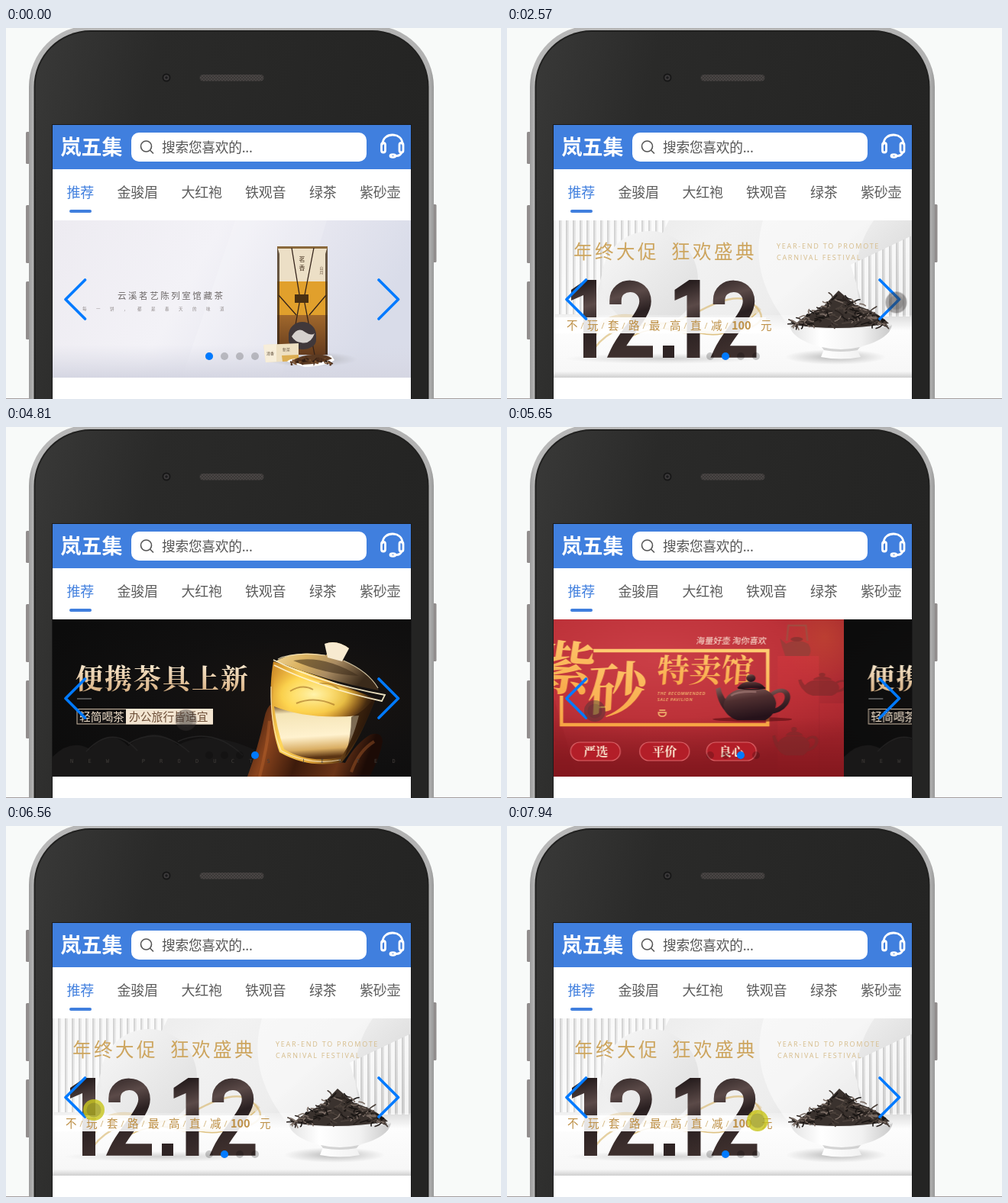
An HTML page for the animation above (8000 ms loop, 648 px wide and 486 px high).

```html
<!DOCTYPE html>
<html lang="zh-CN">
<head>
<meta charset="utf-8">
<title>Tea shop carousel</title>
<style>
html, body { margin: 0; width: 100%; height: 100%; overflow: hidden; background: #f8faf9; }
svg { display: block; }
text { font-family: "Noto Sans CJK SC", "Noto Sans CJK", "Noto Sans", sans-serif; }
.serif { font-family: "Noto Serif CJK SC", "Noto Sans CJK SC", "Noto Serif", serif; font-weight: 700; }
.latin { font-family: "Open Sans", "Noto Sans", sans-serif; }
.nav { font-size: 18px; letter-spacing: -.2px; fill: #5c5c5c; }
.arrow { fill: none; stroke: #007aff; stroke-width: 3.6; stroke-linecap: round; stroke-linejoin: round; }
.line { fill: none; }

#track { animation: slide 8s linear infinite; }
#active { animation: dot 8s step-end infinite; }
#cursor { animation: move 8s linear infinite; }
#tip { animation: press 8s step-end infinite; }

@keyframes slide {
  0% { transform: translateX(0); }
  27.75% { transform: translateX(0); animation-timing-function: ease; }
  31.5% { transform: translateX(-469px); }
  40.875% { transform: translateX(-469px); animation-timing-function: ease; }
  44.625% { transform: translateX(-938px); }
  50.25% { transform: translateX(-938px); animation-timing-function: ease; }
  54% { transform: translateX(-1407px); }
  68.73% { transform: translateX(-1407px); animation-timing-function: ease; }
  72.48% { transform: translateX(-938px); }
  76.125% { transform: translateX(-938px); animation-timing-function: ease; }
  79.875% { transform: translateX(-469px); }
  83.625% { transform: translateX(-469px); animation-timing-function: ease; }
  87.375% { transform: translateX(0); }
  93.125% { transform: translateX(0); }
  95% { transform: translateX(-100px); animation-timing-function: ease; }
  98.75%, 99% { transform: translateX(-469px); }
  99.2%, 100% { transform: translateX(-468px); }
}
@keyframes dot {
  0% { transform: translateX(0); }
  27.75% { transform: translateX(20px); }
  40.875% { transform: translateX(40px); }
  50.25% { transform: translateX(60px); }
  68.73% { transform: translateX(40px); }
  76.125% { transform: translateX(20px); }
  83.625% { transform: translateX(0); }
  95%, 100% { transform: translateX(20px); }
}
@keyframes move {
  0%, 4.5% { transform: translate(593px, 505px); animation-timing-function: ease-out; }
  8.3%, 10.7% { transform: translate(492px, 366px); }
  13.6%, 22.7% { transform: translate(512px, 361px); }
  22.75%, 57.6% { transform: translate(509.5px, 359.5px); }
  60.1% { transform: translate(237px, 384px); animation-timing-function: ease-out; }
  65.5%, 90.6% { transform: translate(115px, 372px); }
  93.125% { transform: translate(428px, 390px); }
  95%, 100% { transform: translate(328px, 386px); }
}
@keyframes press {
  0%, 27.75%, 40.875%, 50.25%, 68.73%, 76.125%, 83.625%, 95% { fill: rgba(60,56,56,.42); }
  25.25%, 39.75%, 49.125%, 67.95%, 75.125%, 81.95%, 93.125%, 99%, 100% { fill: rgba(200,198,30,.82); }
}
</style>
</head>
<body>
<svg width="648" height="486" viewBox="0 0 648 486">
<defs>
  <linearGradient id="body" x2="1" y2=".25"><stop stop-color="#393938"/><stop offset=".3" stop-color="#2a2a29"/><stop offset="1" stop-color="#242423"/></linearGradient>
  <linearGradient id="rim" x2="1"><stop stop-color="#9c9c9c"/><stop offset=".012" stop-color="#b8b8b8"/><stop offset=".988" stop-color="#b2b2b2"/><stop offset="1" stop-color="#999"/></linearGradient>
  <pattern id="mesh" width="4" height="4" patternUnits="userSpaceOnUse"><rect width="4" height="4" fill="#4a4645"/><circle cx="1" cy="1" r=".8" fill="#272525"/><circle cx="3" cy="3" r=".8" fill="#272525"/></pattern>

  <linearGradient id="bgA" x2="1" y2=".25"><stop stop-color="#edebf1"/><stop offset=".45" stop-color="#f3f2f7"/><stop offset=".7" stop-color="#e7e7f0"/><stop offset="1" stop-color="#d9dce9"/></linearGradient>
  <linearGradient id="floorA" x2="0" y2="1"><stop stop-color="#d9dae6" stop-opacity="0"/><stop offset="1" stop-color="#d5d6e2"/></linearGradient>
  <linearGradient id="brown" x2="0" y2="1"><stop stop-color="#a1682c"/><stop offset="1" stop-color="#643b1d"/></linearGradient>

  <linearGradient id="bgB" x2="1" y2=".5"><stop stop-color="#e4e4e4"/><stop offset=".4" stop-color="#f2f2f2"/><stop offset=".7" stop-color="#ededed"/><stop offset="1" stop-color="#d2d2d2"/></linearGradient>
  <linearGradient id="floorB" x2="0" y2="1"><stop stop-color="#fff" stop-opacity=".2"/><stop offset=".25" stop-color="#fdfdfd"/><stop offset=".9" stop-color="#f7f7f7"/><stop offset="1" stop-color="#cfcfcf"/></linearGradient>
  <pattern id="bars" width="9" height="9" patternUnits="userSpaceOnUse"><rect width="5" height="9" fill="#fff" opacity=".75"/><rect x="5" width="2" height="9" fill="#bbb" opacity=".45"/></pattern>
  <linearGradient id="ball" x2="1" y2="1"><stop stop-color="#f8f8f8"/><stop offset="1" stop-color="#dcdcdc"/></linearGradient>
  <linearGradient id="digit" gradientUnits="userSpaceOnUse" x1="90" y1="330" x2="120" y2="432"><stop stop-color="#1d1516"/><stop offset=".35" stop-color="#5b4a48"/><stop offset=".6" stop-color="#2a2021"/><stop offset="1" stop-color="#3d2f2d"/></linearGradient>
  <linearGradient id="bowl" x2="1"><stop stop-color="#e3e3e3"/><stop offset=".3" stop-color="#fff"/><stop offset=".7" stop-color="#f1f1f1"/><stop offset="1" stop-color="#c9c9c9"/></linearGradient>
  <radialGradient id="shade"><stop stop-color="#888" stop-opacity=".6"/><stop offset="1" stop-color="#999" stop-opacity="0"/></radialGradient>

  <radialGradient id="bgC" cx=".48" cy=".25" r=".7"><stop stop-color="#cb3f47"/><stop offset=".55" stop-color="#bd3239"/><stop offset="1" stop-color="#98222a"/></radialGradient>
  <linearGradient id="lowC" x2="0" y2="1"><stop stop-color="#7d141a" stop-opacity="0"/><stop offset="1" stop-color="#7d141a" stop-opacity=".75"/></linearGradient>
  <linearGradient id="pillar" x2="0" y2="1"><stop stop-color="#d2383e" stop-opacity=".55"/><stop offset="1" stop-color="#b0262c" stop-opacity=".15"/></linearGradient>
  <radialGradient id="ember"><stop stop-color="#c8542f" stop-opacity=".45"/><stop offset="1" stop-color="#c8542f" stop-opacity="0"/></radialGradient>
  <linearGradient id="gold" x2="0" y2="1"><stop stop-color="#ffcb72"/><stop offset="1" stop-color="#f7a544"/></linearGradient>
  <linearGradient id="clay" x2=".25" y2="1"><stop stop-color="#8a625e"/><stop offset=".4" stop-color="#4f2f30"/><stop offset="1" stop-color="#25121a"/></linearGradient>
  <g id="pot">
    <path d="M72 24C89 11 105 24 94 40Q86 51 70 52L72 46Q83 44 88 37C95 26 86 18 74 29Z"/>
    <path d="M22 40Q9 33 6 17L0 19Q3 43 20 55Z"/>
    <path d="M10 40Q13 24 32 19H62Q77 24 79 38Q78 53 65 60H28Q11 54 10 40Z"/>
    <path d="M28 18Q33 10 45 9Q60 10 65 18Z"/>
    <ellipse cx="46" cy="5" rx="6" ry="5"/>
  </g>

  <linearGradient id="title" x2="0" y2="1"><stop stop-color="#fff4df"/><stop offset="1" stop-color="#d3a877"/></linearGradient>
  <radialGradient id="bgD" cx=".7" cy=".5" r=".8"><stop stop-color="#1a1512"/><stop offset=".5" stop-color="#111010"/><stop offset="1" stop-color="#0c0c0c"/></radialGradient>
  <linearGradient id="hand" x2="1" y2=".2"><stop stop-color="#1f0d07"/><stop offset=".25" stop-color="#8a441d"/><stop offset=".5" stop-color="#3d1b0b"/><stop offset=".8" stop-color="#6a3417"/><stop offset="1" stop-color="#1c0b06"/></linearGradient>
  <linearGradient id="glass" x2="1" y2=".3"><stop stop-color="#c98422"/><stop offset=".3" stop-color="#ffd75a"/><stop offset=".6" stop-color="#e3a63a"/><stop offset=".85" stop-color="#6e4518"/><stop offset="1" stop-color="#2d1b0c"/></linearGradient>
  <linearGradient id="tea" x2=".1" y2="1"><stop stop-color="#7c5a30"/><stop offset=".15" stop-color="#f4e4b6"/><stop offset=".6" stop-color="#fff2cf"/><stop offset=".85" stop-color="#d9ad62"/><stop offset="1" stop-color="#5a3413"/></linearGradient>
  <radialGradient id="glow" cx=".42" cy=".5" r=".55"><stop stop-color="#fff3ac"/><stop offset=".6" stop-color="#ffd84f" stop-opacity=".75"/><stop offset="1" stop-color="#eaa52a" stop-opacity="0"/></radialGradient>
  <linearGradient id="lid" x2="1" y2=".4"><stop stop-color="#f3dca4"/><stop offset=".35" stop-color="#dcb463"/><stop offset=".65" stop-color="#a98b62"/><stop offset="1" stop-color="#3a2a1a"/></linearGradient>
</defs>

<rect width="648" height="486" fill="#f8faf9"/>
<rect y="485" width="648" height="1" fill="#a59e9e"/>

<!-- phone -->
<g fill="#918d8d">
  <rect x="26" y="136" width="6" height="42" rx="1.5"/><rect x="26" y="232" width="6" height="76" rx="1.5"/>
  <rect x="26" y="332" width="6" height="76" rx="1.5"/><rect x="557" y="231" width="6.5" height="76" rx="1.5"/>
</g>
<rect x="30" y="-3" width="530" height="600" rx="80" fill="url(#rim)"/>
<rect x="36.500" y="3" width="517" height="600" rx="74" fill="#20201f"/>
<rect x="38.500" y="5" width="513" height="600" rx="72" fill="url(#body)"/>
<circle cx="210" cy="65" r="5.500" fill="#171717"/><circle cx="210" cy="65" r="3.600" fill="#3d3b3c"/><circle cx="210" cy="65" r="1.800" fill="#1b1a1c"/>
<rect x="253.500" y="61" width="84" height="8.500" rx="4.200" fill="url(#mesh)"/>

<!-- page -->
<rect x="60" y="126" width="471" height="360" fill="#1a1a1a"/>
<rect x="61" y="127" width="469" height="359" fill="#fff"/>
<rect x="61" y="127" width="469" height="58" fill="#407fde"/>
<text x="71.500" y="166" font-size="27" font-weight="900" fill="#fff">岚五集</text>
<rect x="164" y="137" width="308" height="38" rx="10" fill="#fff"/>
<g class="line" stroke="#555" stroke-width="1.600" stroke-linecap="round"><circle cx="183.500" cy="155" r="7"/><path d="M188.700 160.200L192.500 164"/></g>
<text x="204" y="163" font-size="17.700" letter-spacing="-.25" fill="#555">搜索您喜欢的...</text>
<g class="line" stroke="#fff" stroke-width="2.800" stroke-linecap="round">
  <path d="M493 152C493 136 519 136 519 152"/>
  <rect x="491.500" y="150.500" width="5" height="12.500" rx="2.500"/><rect x="515" y="150.500" width="5" height="12.500" rx="2.500"/>
  <path d="M517.500 164Q515.500 167.500 511 167.500"/><ellipse cx="506.500" cy="167.500" rx="3.500" ry="1.800"/>
</g>
<g class="nav">
  <text x="79.500" y="222" fill="#407fde">推荐</text><text x="145.500" y="222">金骏眉</text><text x="229.500" y="222">大红袍</text>
  <text x="313" y="222">铁观音</text><text x="397" y="222">绿茶</text><text x="463" y="222">紫砂壶</text>
</g>
<rect x="83" y="238" width="29" height="4" rx="2" fill="#407fde"/>

<!-- carousel -->
<svg x="61" y="252" width="469" height="206" viewBox="61 252 469 206">
<g id="track">

<g>
  <rect x="61" y="252" width="469.500" height="206" fill="url(#bgA)"/>
  <path d="M300 252H420L360 458H230Z" fill="#fff" opacity=".15"/>
  <rect x="61" y="415" width="469.500" height="43" fill="url(#floorA)"/>
  <text x="146" y="355" font-size="11.500" letter-spacing="2.550" font-weight="500" fill="#6d6868">云溪茗艺陈列室馆藏茶</text>
  <text x="100" y="370" font-size="5.500" letter-spacing="12.500" fill="#8f8989">每一饼，都是春天的味道</text>
  <ellipse cx="400" cy="434" rx="60" ry="10" fill="url(#shade)"/>
  <path d="M355 286H421V333H355Z" fill="#ecdfc6"/>
  <path d="M355 332H421V377H355Z" fill="#e1a02c"/>
  <path d="M355 376H421V428H355Z" fill="url(#brown)"/>
  <path d="M355 286L358 296V428H355ZM421 286L418 296V428H421Z" fill="#3a2716" opacity=".75"/>
  <path d="M355 286H421V289H355Z" fill="#8a693c"/>
  <path class="line" d="M374 288L385 355L372 428M403 288L390 355L404 428M357 350L380 376M419 350L397 376" stroke="#34231a" stroke-width="1.300"/>
  <g fill="#4c3927" font-size="8" text-anchor="middle"><text x="387.500" y="306">茗</text><text x="387.500" y="317">香</text></g>
  <g fill="#6d5740" font-size="5" text-anchor="middle"><text x="413" y="316">山</text><text x="413" y="322">月</text></g>
  <path d="M378 349h18v11h-18z" fill="#493012"/>
  <path d="M370 402A18 17 0 0 1 406 402V409A18 12 0 0 1 370 409Z" fill="#40383a"/>
  <path d="M374 404Q382 391 391 398Q400 404 404 400Q399 415 386 412Q378 411 374 404Z" fill="#d6d1cd"/>
  <path d="M337 415L383 413V436L340 438Z" fill="#eee0c2"/><path d="M337 415L354 414V437L340 438Z" fill="#f7eeda"/>
  <path d="M361 429L383 428V436L362 437Z" fill="#dcae53"/>
  <text x="341" y="428" font-size="5" fill="#655440">清香</text><text x="362" y="423" font-size="5" fill="#655440">新茶</text>
  <path d="M368 437Q372 432 382 434L426 429L430 435Q419 443 391 444Z" fill="#fff"/>
  <path d="M374 436Q390 427 404 428Q420 427 427 433Q412 440 388 441Z" fill="#5b3a22"/>
  <g id="heap" class="line" stroke-width="1.600"></g>
</g>

<g transform="translate(469)">
  <rect x="61" y="252" width="469.500" height="206" fill="url(#bgB)"/>
  <path d="M61 252H212L196 284Q150 275 125 320L110 375H61Z" fill="url(#bars)"/>
  <path d="M335 252H480Q440 310 470 385H365Q315 320 335 252Z" fill="#fff" opacity=".45"/>
  <path d="M450 310L530 272V378H470Z" fill="url(#bars)"/>
  <circle cx="187" cy="329" r="63" fill="url(#ball)"/>
  <rect x="61" y="376" width="469.500" height="82" fill="url(#floorB)"/>
  <g class="line" stroke="#d8b466">
    <path d="M108 412C130 360 178 382 210 392S300 398 330 366" stroke-width="8" opacity=".32"/>
    <path d="M114 420C150 372 196 402 246 374S318 350 331 372S290 402 245 398" stroke-width="2.500" opacity=".6"/>
    <path d="M140 424C170 386 215 392 253 400S310 388 326 374" stroke-width="1.500" opacity=".8"/>
  </g>
  <ellipse cx="205" cy="433" rx="130" ry="7" fill="url(#shade)" opacity=".6"/>
  <g id="digits">
    <path d="M103 330H117V432H100V350L84 357V343Z" fill="url(#digit)"/>
    <path class="line" d="M142 362V357C142 332 181 332 181 358C181 376 154 400 143 424H191" stroke="url(#digit)" stroke-width="15.500"/>
  </g>
  <use href="#digits" x="135.500"/>
  <rect x="204" y="416" width="15" height="16" fill="#2f2424"/>
  <rect x="61" y="379" width="278" height="21" fill="#fff" opacity=".88"/>
  <g fill="#cda55e">
    <text x="87" y="302" font-size="24.500" letter-spacing="3.500" font-weight="300">年终大促</text>
    <text x="215" y="302" font-size="24.500" letter-spacing="3.500" font-weight="300">狂欢盛典</text>
    <g font-size="9" fill="#d6bc8a"><text class="latin" x="353" y="289" letter-spacing="1.750">YEAR-END TO PROMOTE</text><text class="latin" x="353" y="304" letter-spacing="1.750">CARNIVAL FESTIVAL</text></g>
  </g>
  <g id="offer" font-size="14.500" fill="#bd8f45"></g>
  <ellipse cx="430" cy="431" rx="66" ry="10" fill="url(#shade)"/>
  <path d="M370 389Q372 407 408 417L415 421L411 431Q437 436 463 431L458 421L465 417Q501 407 504 389Z" fill="url(#bowl)"/>
  <path d="M412 418Q437 424 462 418L459 422Q437 426 415 422Z" fill="#c4c4c4" opacity=".7"/>
  <ellipse cx="437" cy="389" rx="67" ry="5" fill="#e9e9e9"/>
  <path d="M376 389Q392 374 412 367L434 344L456 363Q484 371 500 387Q437 398 376 389Z" fill="#3a322e"/>
  <g id="leaves" class="line" stroke-width="1.600" stroke-linecap="round"></g>
</g>

<g transform="translate(938)">
  <rect x="61" y="252" width="469.500" height="206" fill="url(#bgC)"/>
  <path d="M61 252H120L180 458H61Z" fill="#8a1a1f" opacity=".2"/>
  <ellipse cx="505" cy="275" rx="55" ry="60" fill="url(#ember)"/>
  <path d="M443 300H497V458H443ZM498 362H530V458H498ZM90 412H152V458H90ZM82 300H138V400H82Z" fill="url(#pillar)"/>
  <rect x="61" y="380" width="469.500" height="78" fill="url(#lowC)"/>
  <g fill="#7a2a2a" opacity=".6">
    <use href="#pot" transform="translate(92 262) scale(.46 .66)"/>
    <use href="#pot" transform="translate(102 378) scale(.48 .6)"/>
    <use href="#pot" transform="translate(436 393) scale(.62)"/>
    <use href="#pot" transform="translate(470 322) scale(.68 .5)"/>
  </g>
  <g opacity=".7"><path class="line" d="M455 280L457 260H480L482 280" stroke="#9a5444" stroke-width="2.500"/><path d="M446 277L454 284Q468 276 483 284Q489 292 484 300H453Q449 290 446 277Z" fill="#8f4038"/><ellipse cx="468" cy="278" rx="8" ry="3" fill="#7d332f"/></g>
  <path class="line" d="M202 293H430V390H160V352" stroke="url(#gold)" stroke-width="4.600"/>
  <g fill="url(#gold)">
    <text class="serif" font-size="75" transform="translate(125 341) skewX(-5) rotate(4)">紫</text>
    <text class="serif" font-size="77" transform="translate(193 374) skewX(-6) rotate(-3)">砂</text>
    <text class="serif" font-size="42" transform="translate(284 334) skewX(-5)">特卖馆</text>
    <g font-size="5.800" font-style="italic" font-weight="600" fill="#f5bd72"><text class="latin" x="285.500" y="351" letter-spacing=".65">THE RECOMMENDED</text><text class="latin" x="285.500" y="359" letter-spacing=".65">SALE PAVILION</text></g>
    <path class="line" d="M287 374H297Q297 379 292 379T287 374ZM288 371H296" stroke="#f5bd72" stroke-width="1.500"/>
  </g>
  <text font-size="11.200" fill="#fff0df" transform="translate(336 284) skewX(-8)">海量好壶 淘你喜欢</text>
  <ellipse cx="410" cy="383" rx="52" ry="3" fill="#5d1015" opacity=".65"/>
  <use href="#pot" fill="url(#clay)" transform="translate(362 324)"/>
  <path d="M382 352Q390 346 415 347" class="line" stroke="#b48a84" stroke-width="2.500" opacity=".5"/>
  <path d="M391 342Q408 345 427 342" class="line" stroke="#231217" stroke-width="1.300"/>
  <g fill="#b31e28" stroke="#df666b" stroke-width="1.200"><rect x="172" y="413" width="65" height="24" rx="12"/><rect x="262.500" y="413" width="65" height="24" rx="12"/><rect x="350" y="413" width="65" height="24" rx="12"/></g>
  <g font-size="16" fill="#fff1d9" text-anchor="middle"><text class="serif" x="205" y="431">严选</text><text class="serif" x="295" y="431">平价</text><text class="serif" x="382.500" y="431">良心</text></g>
</g>

<g transform="translate(1407)">
  <rect x="61" y="252" width="469.500" height="206" fill="url(#bgD)"/>
  <path d="M61 432Q85 408 110 422Q135 392 160 418Q195 388 225 417Q265 394 330 425V458H61Z" fill="#191818"/>
  <path class="line" d="M105 425Q140 388 172 424M160 415Q200 390 240 426M225 412Q270 392 310 430" stroke="#232222" stroke-width="1.500"/>
  <path d="M316 458Q330 420 338 382Q341 366 349 362Q356 400 366 428L444 440Q458 414 477 403Q492 398 493 412Q490 432 476 458Z" fill="url(#hand)"/>
  <path d="M350 307C343 345 347 397 358 426Q396 448 440 439C459 417 472 386 484 356Q420 329 350 307Z" fill="url(#glass)"/>
  <path d="M351 314Q410 334 478 352Q466 372 450 385Q403 392 349 366Z" fill="url(#glow)"/>
  <path d="M351 366Q396 384 462 378C456 402 448 420 438 433Q395 441 364 422Q354 394 351 366Z" fill="url(#tea)"/>
  <path d="M452 380Q470 372 482 355Q472 392 444 432Q452 405 452 380Z" fill="#2a1609" opacity=".6"/>
  <path d="M372 346Q388 336 402 344M410 336Q426 334 436 344M380 362Q404 352 430 364" class="line" stroke="#9a651c" stroke-width="2" opacity=".55"/>
  <path d="M353 307C369 296 397 294 418 299L423 296L418 284Q433 278 449 290L440 305C466 317 482 329 488 345Q420 333 353 307Z" fill="url(#lid)"/>
  <path d="M376 306Q416 298 462 326Q418 324 376 306Z" fill="#3b2a18" opacity=".55"/>
  <path d="M417 284Q433 278 449 290L440 307L421 302Z" fill="#f7ead0"/>
  <path class="line" d="M350 305Q410 335 496 351L492 359Q410 341 351 312" stroke="#fff3cf" stroke-width="1.800" opacity=".9"/>
  <path class="line" d="M356 304Q376 294 418 299M442 306Q474 320 487 342M347 340Q346 392 360 424Q396 444 438 436" stroke="#fff0c8" stroke-width="1.200" opacity=".75"/>
  <path class="line" d="M332 458Q342 420 345 385M452 452Q462 424 482 412" stroke="#c96d31" stroke-width="4" opacity=".35"/>
  <text class="serif" x="91" y="343" font-size="36" letter-spacing="2" fill="url(#title)">便携茶具上新</text>
  <path d="M93 356H112" stroke="#777" stroke-width="1.300"/>
  <rect x="93" y="369.500" width="177" height="19.500" fill="#151313" stroke="#cbb9a3"/>
  <rect x="157" y="369" width="114" height="20.500" fill="#f3e5d1"/>
  <text x="96" y="384.500" font-size="14.700" fill="#efdfca">轻简喝茶</text><text x="161" y="384.500" font-size="14.800" fill="#6d4e37">办公旅行皆适宜</text>
  <text x="84" y="440" font-size="7" letter-spacing="19.200" fill="#423e3b" style="font-family:'DejaVu Sans Mono',monospace">NEW PRODUCTS LISTED</text>
</g>
</g>
</svg>

<path class="arrow" d="M103.500 330L78 355.500L103.500 381"/>
<path class="arrow" d="M488 330L513.500 355.500L488 381"/>
<g opacity=".2"><circle cx="266" cy="430" r="5"/><circle cx="286" cy="430" r="5"/><circle cx="306" cy="430" r="5"/><circle cx="326" cy="430" r="5"/></g>
<circle id="active" cx="266" cy="430" r="5" fill="#007aff"/>
<g id="cursor"><circle id="tip" r="14"/><circle r="9.500" fill="#333" opacity=".2"/></g>
</svg>

<script>
const $ = id => document.getElementById(id);
let seed = 7;
const rnd = (a, b) => a + (b - a) * ((seed = (seed * 16807) % 2147483647) / 2147483647);

// Short curled strokes scattered inside a mound.
function scatter(id, count, cx, base, half, height, size, tones) {
  let out = "";
  for (let i = 0; i < count; i++) {
    const u = rnd(-1, 1);
    const x = cx + u * half;
    const y = base - rnd(0, 1) * height * Math.pow(1 - Math.abs(u), 0.8);
    const dx = rnd(-size, size), dy = rnd(-size, size) * 0.6;
    out += `<path stroke="${tones[i % tones.length]}" d="M${x} ${y}q${dx / 2 + rnd(-3, 3)} ${dy / 2 + rnd(-3, 3)} ${dx} ${dy}"/>`;
  }
  $(id).innerHTML = out;
}
scatter("leaves", 190, 437, 389, 60, 43, 11, ["#1a1614", "#4a403a", "#2a2320", "#7a6c64"]);
scatter("heap", 55, 400, 439, 27, 10, 5, ["#4a2d1b", "#7b5230", "#2f1d13"]);

const words = [..."不玩套路最高直减", "100", "元"];
$("offer").innerHTML = words.map((w, i) => {
  const x = 78 + 27 * i + (i === 9 ? 11 : 0);
  const bold = w === "100" ? ' font-weight="700"' : "";
  const slash = i < 8 ? `<path d="M${x + 19} 394l3-8" stroke="#d8bd8a"/>` : "";
  return `<text x="${x}" y="395"${bold}>${w}</text>${slash}`;
}).join("");
</script>
</body>
</html>
```
